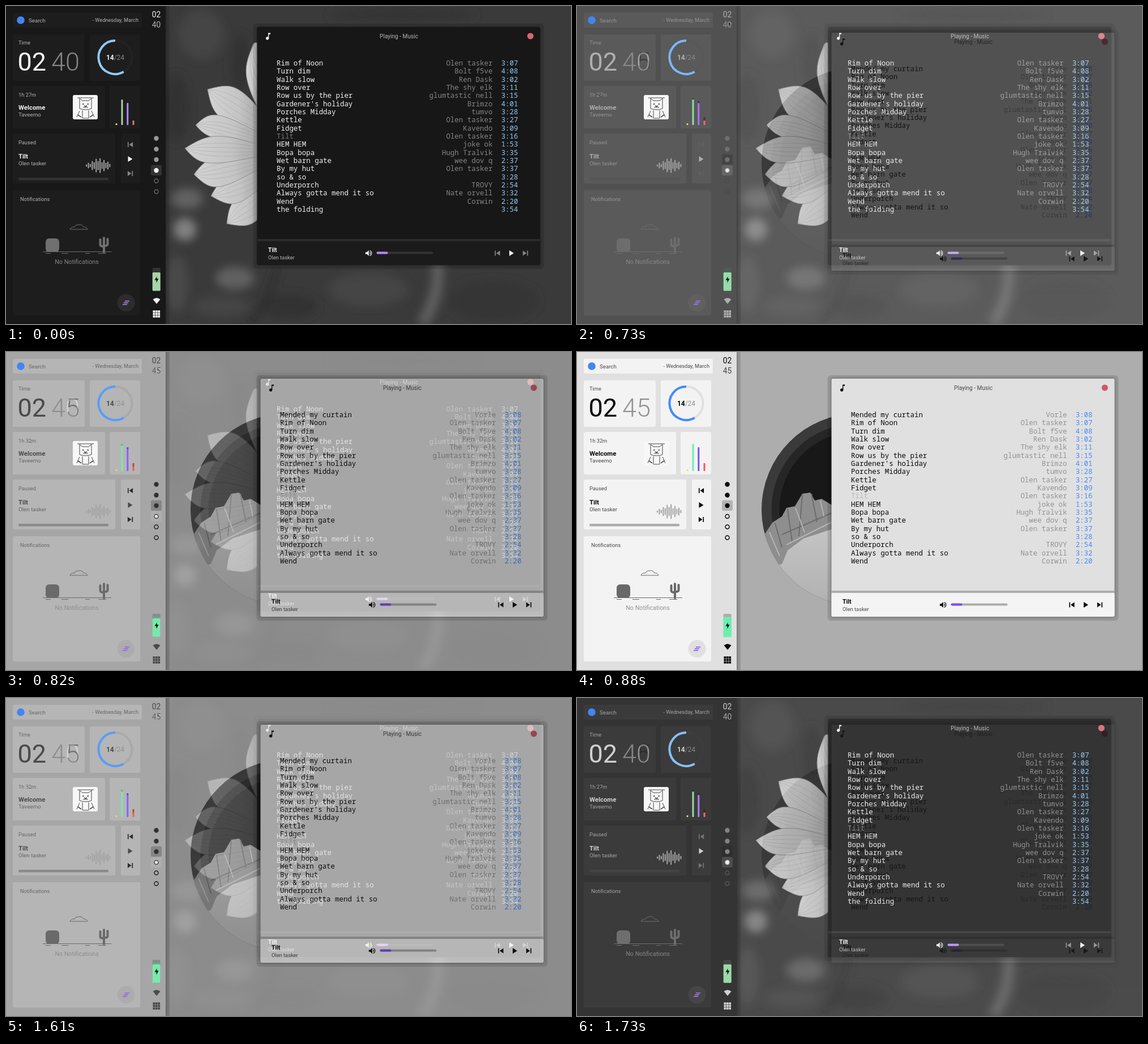
Recreate the animation shown at these times as an HTML page. Size 998 by 561 pixels, loop 1760 ms.

```html
<!DOCTYPE html>
<html lang="en">
<head>
<meta charset="utf-8">
<title>Desktop theme switch</title>
<style>
  html, body { margin: 0; width: 100%; height: 100%; overflow: hidden; background: #181818; }
  svg { display: block; width: 100%; height: 100%; }
  text { font-family: Roboto, sans-serif; white-space: pre; }
  .mono { font-family: "Noto Sans Mono", monospace; }
  .end { text-anchor: end; }
  .mid { text-anchor: middle; }
  .bold { font-weight: 700; }
  .medium { font-weight: 500; }
  .thin { font-weight: 300; }
  .raised { filter: drop-shadow(0 0 2px #0006); }
</style>
</head>
<body>
<svg id="stage" viewBox="0 0 998 561"></svg>
<script>
const tracks = [
  ['Mended my curtain', 'Vorle', '3:08'],
  ['Rim of Noon', 'Olen tasker', '3:07'],
  ['Turn dim', 'Bolt f5ve', '4:08'],
  ['Walk slow', 'Ren Dask', '3:02'],
  ['Row over', 'The shy elk', '3:11'],
  ['Row us by the pier', 'glumtastic nell', '3:15'],
  ["Gardener's holiday", 'Brimzo', '4:01'],
  ['Porches Midday', 'tumvo', '3:28'],
  ['Kettle', 'Olen tasker', '3:27'],
  ['Fidget', 'Kavendo', '3:09'],
  ['Tilt', 'Olen tasker', '3:16'],
  ['HEM HEM', 'joke ok', '1:53'],
  ['Bopa bopa', 'Hugh Tralvik', '3:35'],
  ['Wet barn gate', 'wee dov q', '2:37'],
  ['By my hut', 'Olen tasker', '3:37'],
  ['so &amp; so', '', '3:28'],
  ['Underporch', 'TROVY', '2:54'],
  ['Always gotta mend it so', 'Nate orvell', '3:32'],
  ['Wend', 'Corwin', '2:20'],
  ['the folding', '', '3:54'],
];
const song = 'Tilt', artist = 'Olen tasker';

const dark = {
  panel: '#181818', card: '#1d1d1d', win: '#171717', bar: '#1b1b1b', divider: '#2b2b2b',
  text: '#f2f2f2', soft: '#b4b4b4', dim: '#858585', faint: '#757575', skip: '#858585',
  track: '#333', ring: '#222', blue: '#90caf9', green: '#a5d6a7', purple: '#b388ff',
  red: '#e57373', yellow: '#f0d0a8', close: '#d9646f', fab: '#2c2c2c', active: '#333',
  dot: '#999', hollow: '#666', wave: '#a8a8a8', scene: '#707070',
  minute: '40', uptime: '1h 27m', page: 3, charge: 470, barTops: [207, 165, 171, 202],
  list: tracks.slice(1), shift: [0, 0], wallpaper: flower,
};
const light = {
  panel: '#e0e0e0', card: '#f3f3f3', win: '#e0e0e0', bar: '#f4f4f4', divider: '#adadad',
  text: '#080808', soft: '#484848', dim: '#929292', faint: '#b8b8b8', skip: '#080808',
  track: '#adadad', ring: '#e0e0e0', blue: '#448aff', green: '#69f0ae', purple: '#7c4dff',
  red: '#ff5252', yellow: '#ffd740', close: '#d0576b', fab: '#e0e0e0', active: '#b2b2b2',
  dot: '#080808', hollow: '#080808', wave: '#a0a0a0', scene: '#686868',
  minute: '45', uptime: '1h 32m', page: 2, charge: 467.5, barTops: [207, 162, 168, 196],
  list: tracks.slice(0, -1), shift: [6, 10], wallpaper: record,
};

const box = (x, y, w, h, fill, r = 0) =>
  `<rect x="${x}" y="${y}" width="${w}" height="${h}" rx="${r}" fill="${fill}"/>`;
const disc = (x, y, r, fill) => `<circle cx="${x}" cy="${y}" r="${r}" fill="${fill}"/>`;
const label = (x, y, str, size, fill, cls = '') =>
  `<text x="${x}" y="${y}" font-size="${size}" fill="${fill}" class="${cls}">${str}</text>`;
const line = (d, stroke, width = 1, extra = '') =>
  `<path d="${d}" fill="none" stroke="${stroke}" stroke-width="${width}" ${extra}/>`;
const shape = (d, fill, x = 0, y = 0, scale = '1') =>
  `<path d="${d}" fill="${fill}" transform="translate(${x} ${y}) scale(${scale})"/>`;
const each = (list, draw) => list.map(draw).join('');
const mix = (a, b, k) => a + (b - a) * k;

const icon = {
  skip: 'M-4.6-4.5h1.7v9h-1.7zM4.6-4.5v9L-2 0z',
  play: 'M-3-5L5 0-3 5z',
  speaker: 'M-6-2h3l4-4v12l-4-4h-3z',
  note: 'M0-9v10.6a4 4 0 1 0 2 3.4V-5h4v-4z',
  bolt: 'M1-6L-3.5 1H-.5V6L3.5-1.5H.5V-6z',
  wifi: 'M-6.5-2.5Q0-7.5 6.5-2.5L0 5.5z',
};

function flower() {
  const blobs = [
    [345, 50, 40, 44, '#454545'], [415, 100, 18, 50, '#333'], [300, 180, 24, 60, '#323232'],
    [320, 340, 28, 18, '#626262'], [316, 394, 20, 20, '#808080'], [404, 480, 34, 20, '#606060'],
    [302, 490, 20, 50, '#4a4a4a'], [380, 530, 50, 18, '#444'], [500, 530, 50, 22, '#333'],
    [640, 500, 70, 30, '#454545'], [860, 520, 80, 36, '#363636'], [700, 16, 130, 14, '#353535'],
  ];
  // tip, upper control, lower control, base top, base bottom
  const petals = [
    [437, 67, 443, 62, 415, 122, 75, 190],
    [390, 384, 396, 339, 430, 391, 310, 372],
    [362, 335, 385, 296, 405, 359, 282, 320],
    [356, 147, 407, 134, 368, 203, 185, 228],
    [332, 297, 360, 261, 370, 333, 262, 285],
    [335, 210, 368, 180, 358, 236, 226, 246],
    [316, 251, 368, 220, 348, 287, 246, 264],
  ];
  const petal = ([x, y, ux, uy, lx, ly, top, bottom]) => {
    const upper = `${mix(ux, x, .25)} ${mix(uy, y, .25)}`;
    const lower = `${mix(lx, x, .25)} ${mix(ly, y, .25)}`;
    return `<path d="M450 ${top}C${ux} ${uy} ${upper} ${x} ${y}C${lower} ${lx} ${ly} 450 ${bottom}z"
      fill="url(#petal)" stroke="#909090" stroke-linejoin="round"/>` +
      each([.2, .4, .6, .8], k => line(
        `M450 ${mix(top, bottom, k)}Q${mix(ux, lx, k)} ${mix(uy, ly, k)} ${x} ${y}`,
        '#808080', .8, 'opacity=".35"'));
  };
  return box(0, 0, 998, 561, '#3a3a3a') +
    `<g filter="url(#blur)">
      ${each(blobs, ([x, y, rx, ry, fill]) =>
        `<ellipse cx="${x}" cy="${y}" rx="${rx}" ry="${ry}" fill="${fill}"/>`)}
      ${line('M762 450Q768 510 735 561', '#606060', 20)}
      ${line('M480 460Q465 520 430 561', '#2b2b2b', 9)}
    </g>` + each(petals, petal);
}

function record() {
  const rocks = 'M326 330L345 301 362 290 370 275 385 272 398 250 412 248 420 262 432 259 ' +
    '452 271V312L400 329 372 350 362 374 340 380z';
  return box(0, 0, 998, 561, '#adadad') +
    `<g clip-path="url(#disc)">
      ${disc(495.5, 278, 170, '#3a3a3a')}${disc(495.5, 278, 152, '#262626')}
      ${disc(495.5, 278, 138, '#181818')}
      <path d="M320 340L372 330 452 300V450H320z" fill="url(#mist)"/>
      ${shape(rocks, '#8e8e8e')}
      ${line('M350 302L362 345M372 277L380 335M398 252L392 325M414 250L424 300M362 322L450 284', '#6c6c6c', 2)}
      ${line('M340 318L358 360M386 275L402 318M430 262L436 290M370 340L450 300', '#b4b4b4', 2)}
    </g>`;
}

const transport = (c, [prev, play, next]) =>
  shape(icon.skip, c.skip, ...prev) + shape(icon.play, c.text, ...play) +
  shape(icon.skip, c.skip, ...next, '-1 1');

function avatar() {
  return box(118, 157, 44, 43, '#f7f7f7', 3) +
    line('M130 181V163l5 4h11l5-4v18q-10 4-21 0zM126 162h29M130 185l-5 11M151 185l5 11' +
      'M135 184v14h11v-14M136 179h9', '#444', 1) +
    line('M135 173h2.5M143.5 173h2.5M138 176q2.5 2 5 0M127 192l6 4M154 192l-6 4', '#222', 1.5);
}

function cards(c) {
  const wave = [4, 10, 6, 16, 12, 24, 16, 26, 12, 20, 10, 14, 6];
  const barFills = [c.yellow, c.green, c.purple, c.red];
  const barLefts = [193.5, 203.5, 213.3, 223.5];
  const frames = [
    [12, 12, 228, 26], [12, 50, 127, 82], [148, 50, 89, 82], [12, 141, 163, 75],
    [183, 141, 54, 75], [12, 225, 181, 88], [203, 225, 34, 88], [12, 325, 225, 221],
  ];
  return each(frames, f => box(...f, c.card, 3)) +
    disc(26, 25, 6.8, '#4285f4') +
    label(40, 28.5, 'Search', 9.7, c.soft) +
    label(234, 28.3, '- Wednesday, March', 9.2, c.soft, 'end') +
    label(22, 68, 'Time', 9.3, c.soft) +
    label(20.5, 113.5, '02', 45, c.text) +
    label(80, 113.5, c.minute, 45, c.dim, 'thin') +
    `<circle cx="193" cy="90.5" r="29.5" fill="none" stroke="${c.ring}" stroke-width="4"/>` +
    line('M193 61A29.5 29.5 0 1 0 207.7 116', c.blue, 4) +
    label(193, 95, `<tspan class="bold" fill="${c.text}">14</tspan>/24`, 12, c.dim, 'mid') +
    label(22, 159.5, c.uptime, 9.3, c.soft) +
    label(22, 183, 'Welcome', 11.4, c.text, 'bold') +
    label(22, 195, 'Taveemo', 9.8, c.soft) +
    avatar() +
    each(c.barTops, (top, i) => box(barLefts[i], top, 3, 210 - top, barFills[i], 1)) +
    label(22, 244, 'Paused', 9.3, c.soft) +
    label(22, 269, song, 11.4, c.text, 'bold') +
    label(22, 281.3, artist, 9.8, c.soft) +
    each(wave, (h, i) => box(141 + i * 3.45, 281.5 - h / 2, 2, h, c.wave, 1)) +
    box(22, 303, 159, 4.5, c.track, 1.5) +
    transport(c, [[219.5, 244.5], [218.5, 270], [219.5, 295.5]]) +
    label(25, 343.5, 'Notifications', 9.2, c.soft) +
    line('M113 394h31q-2-5-7-4-3-6-10-4-5 0-6 4-6-1-8 4', c.scene) +
    line('M65 433.5h121M70 436.5h9M98 436.5h12M140 436.5h8M163 436.5h14', c.scene) +
    box(70, 410, 24, 24, c.scene, 6) +
    line('M173 434V409M166.5 412v9q0 3 6 3M179.5 411v9q0 3-6 3', c.scene, 4, 'stroke-linecap="round"') +
    label(125, 454.5, 'No Notifications', 10.75, c.dim, 'mid') +
    disc(212, 523.5, 15.5, c.fab) +
    line('M210 520.5h8M208 523.5h8M206 526.5h8', c.purple, 1.4);
}

function dock(c) {
  const ys = [233.5, 252.5, 271, 290, 308.5, 327.5];
  const page = (y, i) => {
    if (i === c.page) return box(256, y - 9.5, 19, 18.5, c.active, 3) + disc(265.5, y, 4.2, c.text);
    return i < c.page ? disc(265.5, y, 4.2, c.dot)
      : `<circle cx="265.5" cy="${y}" r="3.5" fill="none" stroke="${c.hollow}" stroke-width="1.5"/>`;
  };
  const cells = [0, 1, 2, 3, 4, 5, 6, 7, 8];
  return label(265.5, 20, '02', 13.8, c.text, 'mid') +
    label(265.5, 37.5, c.minute, 13.8, c.soft, 'mid') +
    each(ys, page) +
    box(258.7, 462, 14, 40.5, c.track, 1.5) +
    box(258.7, c.charge, 14, 502.5 - c.charge, c.green, 1.5) +
    shape(icon.bolt, '#111', 266, 482.5) +
    shape(icon.wifi, c.text, 266, 520) +
    each(cells, i => box(259.5 + i % 3 * 4.4, 537 + Math.floor(i / 3) * 4.4, 3.8, 3.8, c.text));
}

function player(c) {
  const row = ([title, by, length], i) => {
    const y = 105 + i * 14.33;
    return label(478, y, title, 12.45, title === song ? c.faint : c.text, 'mono medium') +
      label(859.5, y, by, 12.45, c.dim, 'mono end') +
      label(904.5, y, length, 12.45, c.blue, 'mono medium end');
  };
  return `<g transform="translate(${c.shift})">
    ${box(436.5, 31, 514, 433, '#0002', 6)}
    <g class="raised">${box(443.5, 37, 500, 420, c.win, 3)}</g>
    ${box(443.5, 415, 500, 42, c.bar, 3)}${box(443.5, 411, 500, 4, c.divider)}
    ${shape(icon.note, c.text, 463, 53.5, '.68')}
    ${label(694, 56.6, 'Playing - Music', 10.1, c.soft, 'mid')}
    ${disc(926.3, 53, 5.6, c.close)}
    ${each(c.list, row)}
    ${label(463, 434, song, 10.4, c.text, 'bold')}
    ${label(463, 446.5, artist, 9.3, c.soft)}
    ${shape(icon.speaker, c.text, 640, 436, '.85')}
    <g transform="translate(640 436)">
      ${line('M2.5-2a2.5 2.5 0 0 1 0 4M2.5-4.5a4.7 4.7 0 0 1 0 9', c.text, 1.2)}
    </g>
    ${box(654.5, 433.5, 100, 4, c.track, 2)}${box(654.5, 433.5, 20, 4, c.purple, 2)}
    ${transport(c, [[868, 436], [892, 436], [917.5, 436]])}
  </g>`;
}

const desktop = c => c.wallpaper() + box(282, 0, 7, 561, '#0002') +
  `<g class="raised">${box(0, 0, 282, 561, c.panel)}</g>` + cards(c) + dock(c) + player(c);

document.getElementById('stage').innerHTML = `
  <defs>
    <filter id="blur" x="-20%" y="-20%" width="140%" height="140%"><feGaussianBlur stdDeviation="8"/></filter>
    <linearGradient id="petal">
      <stop offset="0" stop-color="#d4d4d4"/><stop offset=".6" stop-color="#c4c4c4"/>
      <stop offset="1" stop-color="#a4a4a4"/>
    </linearGradient>
    <linearGradient id="mist" x2="0" y2="1">
      <stop offset="0" stop-color="#c6c6c6"/><stop offset="1" stop-color="#b0b0b0"/>
    </linearGradient>
    <clipPath id="disc"><circle cx="495.5" cy="278" r="169.5"/></clipPath>
  </defs>
  <g>${desktop(dark)}</g>
  <g id="day">${desktop(light)}</g>`;

// The themes cross-fade in sevenths, one step every 30 ms.
const LOOP = 1760, STEP = 30, STEPS = 7;
const stepsSince = (t, start) =>
  Math.max(0, Math.min(STEPS, Math.floor((t - start) / STEP) + 1));

const day = document.getElementById('day');
const started = performance.now();
function draw() {
  const t = (performance.now() - started) % LOOP;
  day.setAttribute('opacity', (stepsSince(t, 700) - stepsSince(t, 1580)) / STEPS);
  requestAnimationFrame(draw);
}
draw();
</script>
</body>
</html>
```
